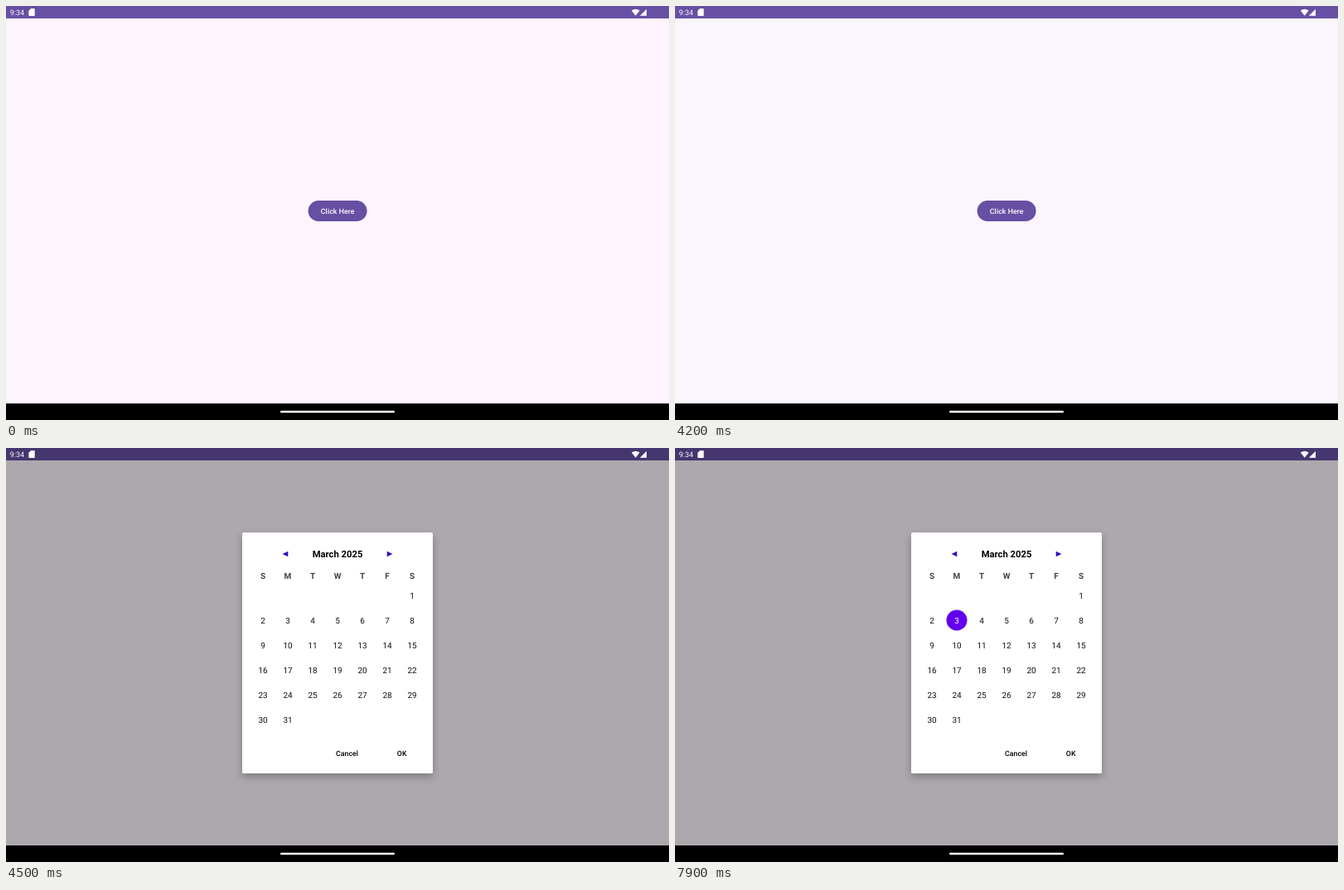
Write an HTML page that moves like this. It is 800 by 500 pixels and loops after 8000 ms.

```html
<!DOCTYPE html>
<html lang="en">
<head>
<meta charset="utf-8">
<title>Date picker dialog</title>
<style>
  html, body { margin: 0; width: 100%; height: 100%; overflow: hidden; background: #000; }
  svg { display: block; width: 100vw; height: 100vh; }
  text { font-family: Roboto, sans-serif; text-rendering: geometricPrecision; }
  .mid { text-anchor: middle; }
  .label { font-size: 8.75px; font-weight: 500; letter-spacing: .06px; }
  .title { font-size: 11.25px; font-weight: 700; }
  .weekday { font-size: 10px; font-weight: 700; fill: #444347; }
  .day { font-size: 10px; fill: #111; }
  .panel { filter: drop-shadow(0 4px 5px rgba(0, 0, 0, .27)); }

  .page, .scrim, .dialog, .mark, .picked { animation: 8s step-end infinite; }
  .page { animation-name: page; }
  .scrim { animation-name: scrim; }
  .dialog { animation-name: dialog; }
  .mark { animation-name: mark; }
  .picked { animation-name: picked; }

  @keyframes page {
    0% { fill: #fdf4ff; }
    1.25%, 100% { fill: #fbf6fd; }
  }
  @keyframes scrim {
    0% { opacity: 0; }
    55% { opacity: .075; }
    56.25%, 100% { opacity: .318; }
  }
  @keyframes dialog {
    0% { opacity: 0; transform: translateY(5.8px); }
    55% { opacity: .56; transform: translateY(5.8px); }
    56.25%, 100% { opacity: 1; transform: none; }
  }
  @keyframes mark {
    0% { opacity: 0; }
    86.25%, 100% { opacity: 1; }
  }
  @keyframes picked {
    0% { fill: #111; }
    86.25%, 100% { fill: #fff; }
  }
</style>
</head>
<body>
<svg viewBox="0 0 800 500">
  <rect class="page" width="800" height="480"/>
  <rect width="800" height="15" fill="#674fa3"/>

  <rect x="364.6" y="235" width="71" height="25" rx="12.5" fill="#674fa3"/>
  <text class="label mid" x="400.2" y="250.9" fill="#fff">Click Here</text>

  <rect class="scrim" width="800" height="480"/>

  <g fill="#fff">
    <text x="4.8" y="11.1" font-size="9">9:34</text>
    <path d="M30 3h4q.7 0 .7.8v7.4q0 .8-.7.8h-5.900q-.7 0-.7-.8V5.700z"/>
    <path d="M754.800 5.600q4.900-3.700 9.800 0l-4.900 6.200z"/>
    <path d="M773 3.700v8.100h-8.100z"/>
  </g>

  <g class="dialog">
    <rect class="panel" x="285" y="102" width="230" height="291" rx="1.500" fill="#fff"/>
    <path d="M333.500 128l6.800-3.300v6.600zM466.500 128l-6.800-3.300v6.600z" fill="#2a12c0"/>
    <text class="title mid" x="400" y="131.500">March 2025</text>
    <circle class="mark" cx="340" cy="208" r="12.500" fill="#6200ee"/>
    <g id="calendar"></g>
    <text class="label mid" x="411.500" y="371.500">Cancel</text>
    <text class="label mid" x="477.700" y="371.500">OK</text>
  </g>

  <rect y="480" width="800" height="20"/>
  <rect x="331" y="488.700" width="138" height="2.600" rx="1.300" fill="#fff"/>
</svg>
<script>
  const calendar = document.getElementById('calendar');
  const SELECTED = 3;
  const FIRST_COLUMN = 6;

  function addCell(content, column, y, className) {
    const cell = document.createElementNS(calendar.namespaceURI, 'text');
    cell.setAttribute('class', className + ' mid');
    cell.setAttribute('x', 310 + column * 30);
    cell.setAttribute('y', y);
    cell.textContent = content;
    calendar.append(cell);
  }

  [...'SMTWTFS'].forEach((name, column) => addCell(name, column, 157.6, 'weekday'));

  for (let day = 1; day <= 31; day++) {
    const slot = day - 1 + FIRST_COLUMN;
    const y = 181.6 + Math.floor(slot / 7) * 30;
    addCell(day, slot % 7, y, day === SELECTED ? 'day picked' : 'day');
  }
</script>
</body>
</html>
```
